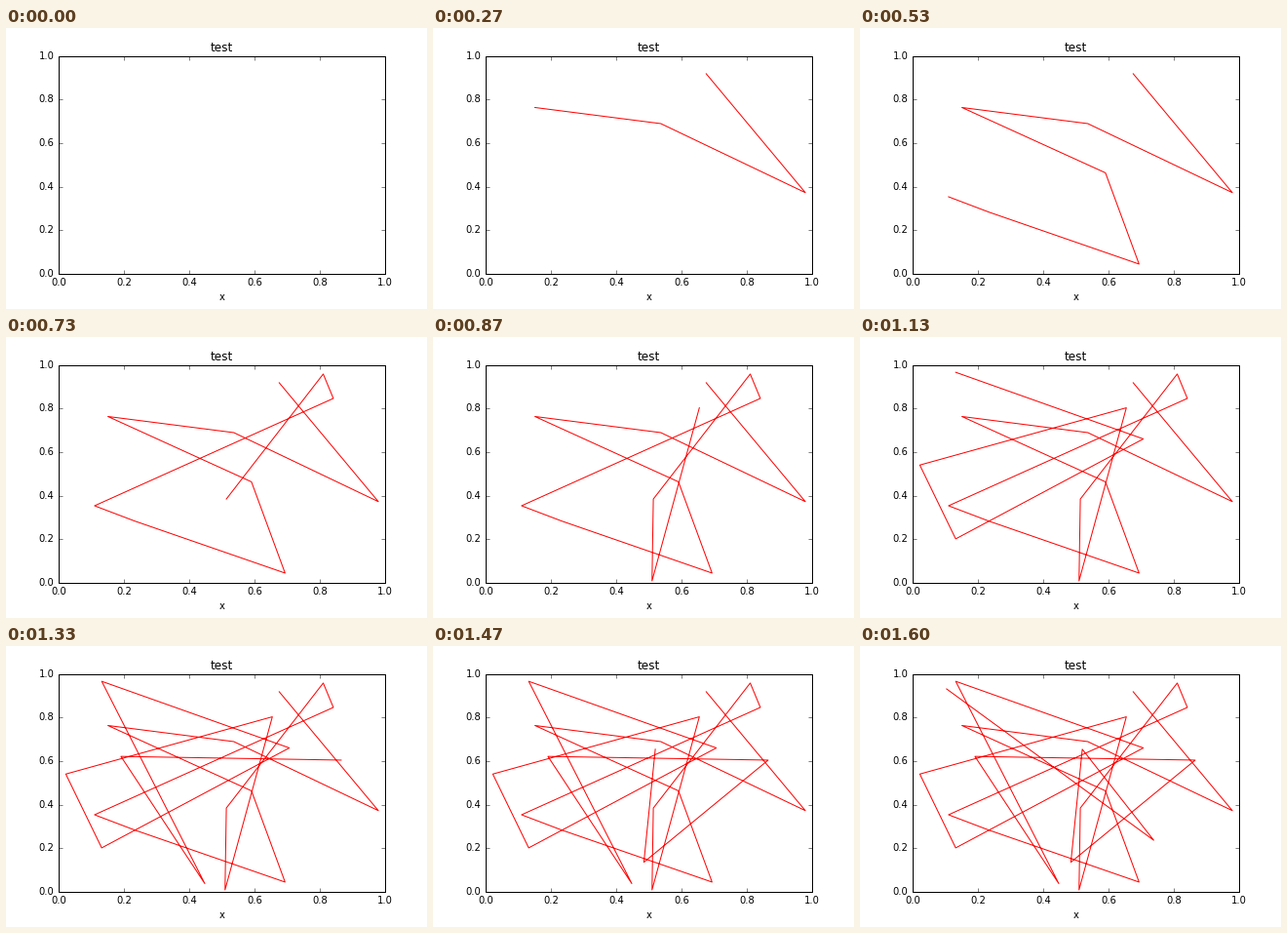
These frames come from a looping animation (432 by 288 pixels, 1670 ms). A matplotlib script:

```python
import matplotlib.pyplot as plt
from matplotlib.animation import FuncAnimation

STEP_MS = 10
LOOP_MS = 1670

plt.style.use("classic")
plt.rcParams.update({
    "font.family": "DejaVu Sans",
    "font.size": 10,
    "figure.dpi": 72,
    "savefig.dpi": "figure",
    "figure.facecolor": "white",
    "figure.edgecolor": "white",
    "figure.subplot.bottom": 0.125,
    "ytick.major.pad": 4.5,
})

# Key points of the path, in the order they are joined
xs = [0.676, 0.980, 0.537, 0.151, 0.591, 0.694, 0.233, 0.110,
      0.842, 0.811, 0.514, 0.510, 0.655, 0.022, 0.132, 0.707,
      0.132, 0.448, 0.191, 0.866, 0.485, 0.520, 0.739, 0.104]
ys = [0.919, 0.373, 0.690, 0.764, 0.464, 0.045, 0.284, 0.354,
      0.847, 0.959, 0.385, 0.009, 0.804, 0.541, 0.202, 0.661,
      0.967, 0.038, 0.622, 0.605, 0.136, 0.655, 0.237, 0.932]

fig, ax = plt.subplots(figsize=(6, 4))
ax.set(xlim=(0, 1), ylim=(0, 1), xlabel="x", title="test")
line, = ax.plot([], [], "r-", lw=1)


def points_shown(ms):
    """One more point at 15 per second, rounded to hundredths of a second."""
    return (3 * ms + 10) // 200


def update(frame):
    count = points_shown(frame * STEP_MS)
    line.set_data(xs[:count], ys[:count])
    return line,


anim = FuncAnimation(fig, update, frames=LOOP_MS // STEP_MS,
                     interval=STEP_MS, repeat=True, repeat_delay=0)
plt.show()
```
